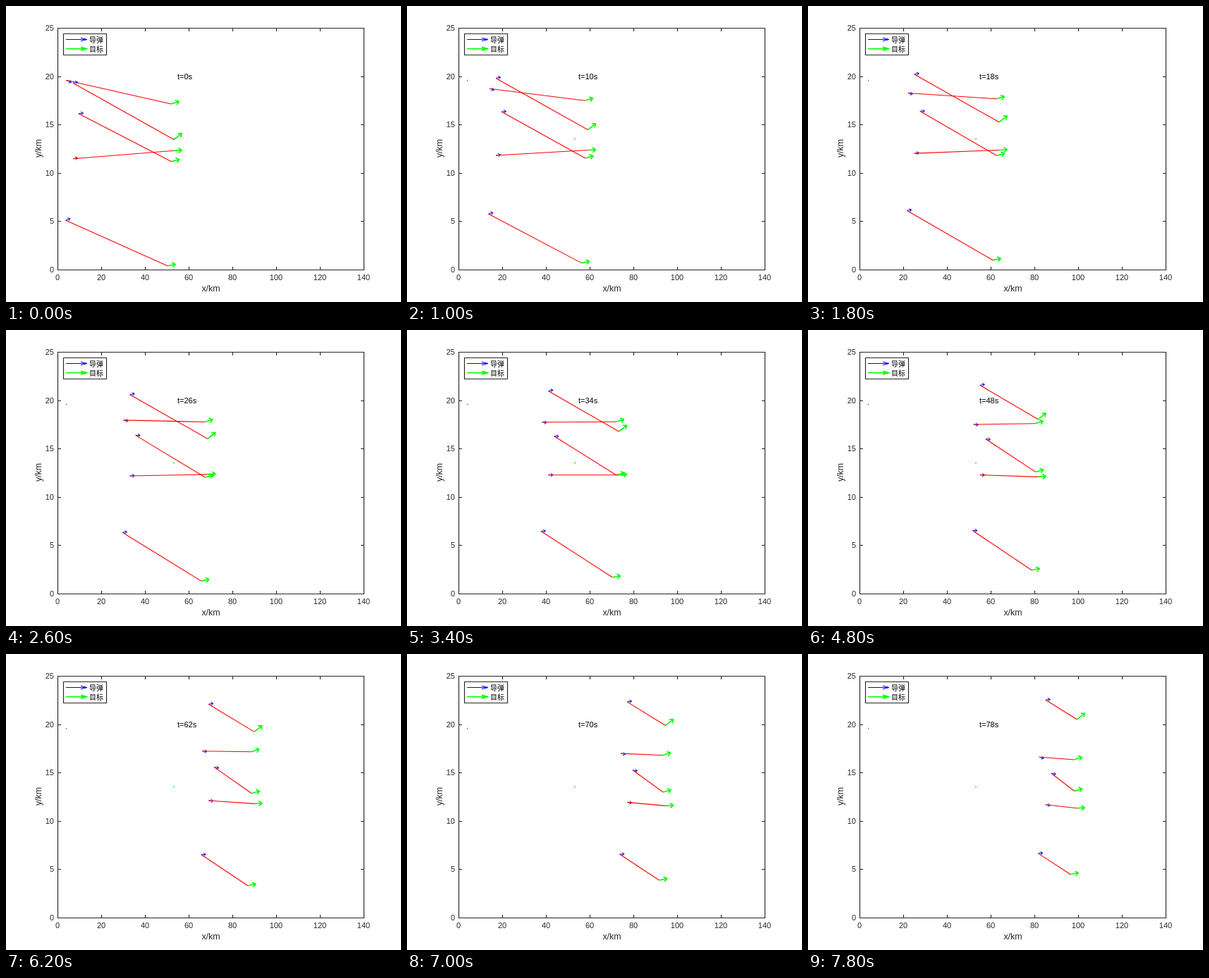
Animation of 560 by 420 pixels, one loop 8 s. Source, as an HTML page:

```html
<!DOCTYPE html>
<html lang="zh">
<head>
<meta charset="utf-8">
<style>
  html, body { margin: 0; width: 100%; height: 100%; overflow: hidden; background: #fff; }
  svg { display: block; width: 560px; height: 420px; }
  path, rect { fill: none; stroke-linejoin: round; }
  text { font: 11px "Liberation Sans", Arial, sans-serif; fill: #262626; }
  .axis { font-size: 12.4px; text-anchor: middle; }
  .clock { fill: #000; }
  .legend { font: 500 10px "Noto Sans CJK SC", "Noto Sans CJK", sans-serif; fill: #000; }
  .frame { stroke: #262626; stroke-width: 1.15; }
  .missile { stroke: #00f; }
  .target { stroke: #0f0; stroke-width: 1.6; }
  .sight { stroke: #f00; stroke-width: 1.1; }
</style>
</head>
<body>
<svg viewBox="0 0 560 420"></svg>
<script>
const svg = document.querySelector('svg');
const STEP_MS = 200, STEPS = 40, SECONDS_PER_STEP = 2;
const LEFT = 73, RIGHT = 507, TOP = 31, BOTTOM = 374;

// Coordinates are polynomials of time in seconds: start, speed, turn, change of turn.
const missile = (x, ...y) => ({ x: [x, 3.1], y });
const target = (x, ...y) => ({ x: [x, 1.835], y });
const PAIRS = [
  [missile(86, 105.5, 1.412, -.02606, .000188), target(234, 139, -.563, .00902)],
  [missile(95, 109.3, -.685, -.00028, .000023), target(238, 189.5, -1.414, .00223)],
  [missile(103, 152.7, -.368, .0101, -.000034), target(234.5, 220.8, -.511, .00223)],
  [missile(95, 216.8, -.543, .00645), target(238, 205.3, -.113, .00367)],
  [missile(84.5, 304, -1.091, .02034, -.000126), target(229, 368.8, -.373, -.00442)]
];

const value = (poly, t) => poly.reduceRight((sum, c) => sum * t + c, 0);
const slope = (poly, t) => value(poly.slice(1).map((c, i) => c * (i + 1)), t);

function add(tag, attrs, text) {
  const node = document.createElementNS('http://www.w3.org/2000/svg', tag);
  for (const key in attrs) node.setAttribute(key, attrs[key]);
  if (text !== undefined) node.textContent = text;
  return svg.appendChild(node);
}

function arrow(x, y, dx, dy, back, half) {
  const len = Math.hypot(dx, dy), ux = dx / len, uy = dy / len;
  const tx = x + dx, ty = y + dy;
  const wing = side => `${tx - ux * back - uy * half * side} ${ty - uy * back + ux * half * side}`;
  return `M${x} ${y}L${tx} ${ty}M${wing(1)}L${tx} ${ty}L${wing(-1)}`;
}

function drawAxes() {
  let d = `M${LEFT + .5} ${TOP + .5}H${RIGHT + .5}V${BOTTOM + .5}H${LEFT + .5}Z`;
  for (let km = 0; km <= 140; km += 20) {
    const x = LEFT + Math.round(km * 3.1);
    d += `M${x + .5} ${BOTTOM}v-4M${x + .5} ${TOP}v5`;
    add('text', { x, y: 389, 'text-anchor': 'middle' }, km);
  }
  for (let km = 0; km <= 25; km += 5) {
    const y = BOTTOM - Math.round(km * 13.72);
    d += `M${LEFT} ${y + .5}h5M${RIGHT} ${y + .5}h-4`;
    add('text', { x: 68, y: y + 4, 'text-anchor': 'end' }, km);
  }
  add('path', { d, class: 'frame' });
  add('text', { x: 290.5, y: 405, class: 'axis' }, 'x/km');
  add('text', { transform: 'translate(50 202) rotate(-90)', class: 'axis' }, 'y/km');
}

function drawLegend() {
  add('rect', { x: 81.5, y: 39.5, width: 61, height: 30, class: 'frame' });
  add('path', { d: arrow(85, 47.5, 30, 0, 9, 2.3), class: 'missile' });
  add('path', { d: arrow(85, 60.7, 30, 0, 9, 2.3), class: 'target' });
  add('text', { x: 118, y: 51.5, class: 'legend' }, '导弹');
  add('text', { x: 118, y: 65, class: 'legend' }, '目标');
}

drawAxes();
drawLegend();
add('path', { d: 'M85 105.5h1', stroke: '#000' });
add('path', { d: 'M237 188.5h2', class: 'target' });
const shapes = PAIRS.map(() => ['missile', 'target', 'sight'].map(name => add('path', { class: name })));
const clock = add('text', { x: 243, y: 104, class: 'clock' });

function render(now) {
  const t = Math.floor(now / STEP_MS) % STEPS * SECONDS_PER_STEP;
  PAIRS.forEach(([m, g], i) => {
    const from = [value(m.x, t), value(m.y, t)], to = [value(g.x, t), value(g.y, t)];
    const paths = [
      arrow(...from, slope(m.x, t) * 2.1, slope(m.y, t) * 2.1, 3.2, 2.3),
      // Target arrows keep their starting heading.
      arrow(...to, slope(g.x, 0) * 6.1, slope(g.y, 0) * 6.1, 4.5, 3.4),
      `M${from}L${to}`
    ];
    paths.forEach((d, k) => shapes[i][k].setAttribute('d', d));
  });
  clock.textContent = `t=${t}s`;
  requestAnimationFrame(render);
}
render(0);
</script>
</body>
</html>
```
